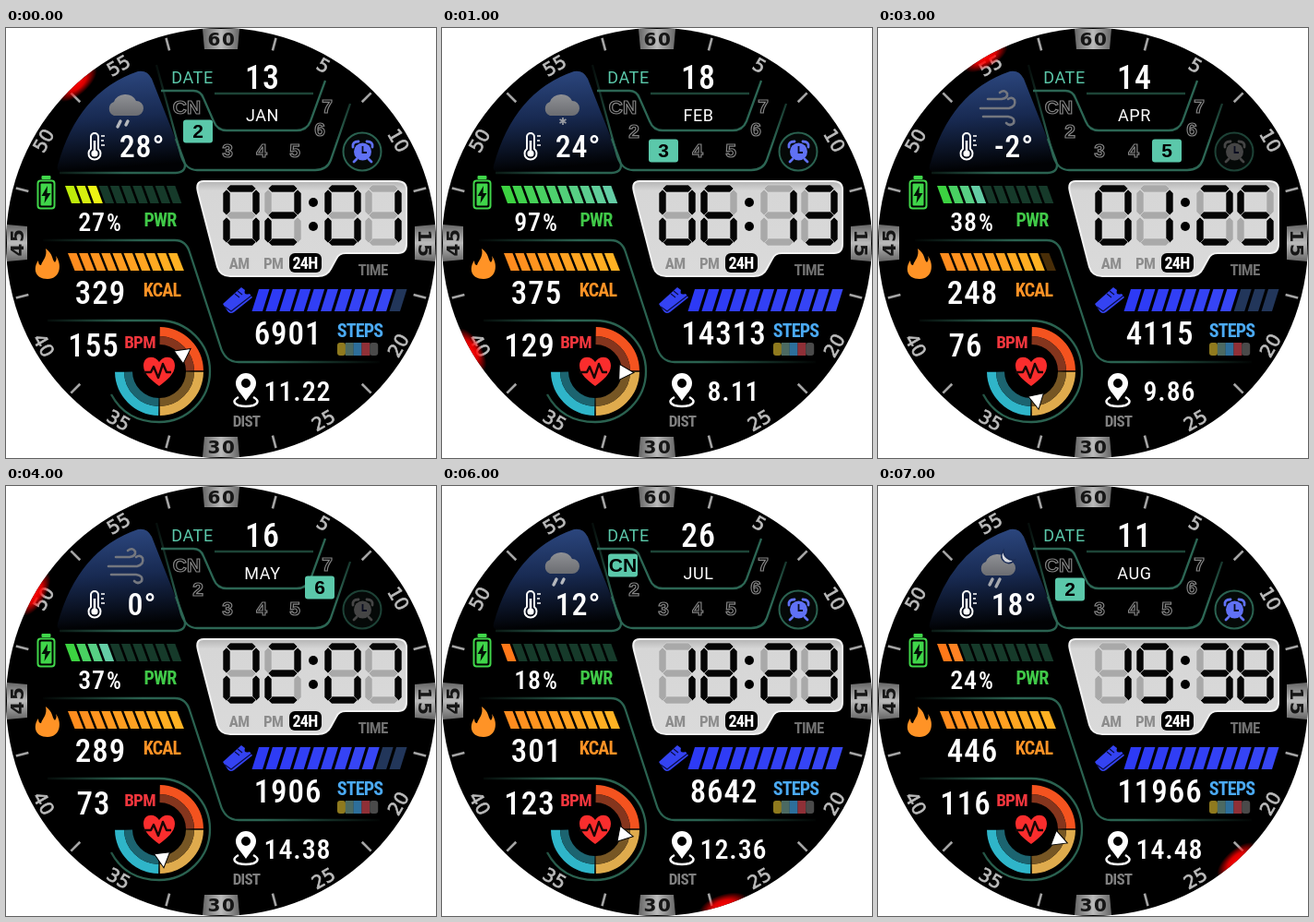
An HTML page for the animation above (8 s loop, 466x466 px).

```html
<!DOCTYPE html>
<html lang="en">
<head>
<meta charset="utf-8">
<title>Watch face</title>
<style>
  html, body { margin: 0; width: 100%; height: 100%; overflow: hidden; background: #fff; }
  svg { display: block; width: 100vw; height: 100vh; }
  text { font-family: "Roboto Condensed", Roboto, sans-serif; font-stretch: 75%; text-anchor: middle; }
  .num { fill: #fff; font-weight: 500; letter-spacing: .9px; }
  .tag { font-weight: 600; letter-spacing: -.8px; }
  .wide { font-family: Roboto, sans-serif; font-stretch: 100%; letter-spacing: .6px; }
  .day { font: bold 21px "Liberation Sans", sans-serif; }
  .mark { font: 20px "DejaVu Sans", sans-serif; }
  .plate { font: bold 20px "DejaVu Sans", sans-serif; letter-spacing: 1.5px; }
  .line { fill: none; stroke-width: 2.3; }
</style>
</head>
<body>
<svg viewBox="0 0 466 466">
  <defs>
    <clipPath id="dial"><circle cx="233" cy="233" r="233"/></clipPath>
    <linearGradient id="sky" x1=".45" y1="0" x2=".55" y2="1">
      <stop offset="0" stop-color="#2c477f"/><stop offset=".45" stop-color="#182a52"/><stop offset=".95" stop-color="#010204"/>
    </linearGradient>
    <linearGradient id="lcd" x1="0" y1="0" x2="0" y2="1">
      <stop offset="0" stop-color="#b4b4b4"/><stop offset=".1" stop-color="#d6d6d6"/><stop offset="1" stop-color="#dadada"/>
    </linearGradient>
    <linearGradient id="plate" x1="0" y1="0" x2="1" y2="0">
      <stop offset="0" stop-color="#666"/><stop offset=".5" stop-color="#bbb"/><stop offset="1" stop-color="#666"/>
    </linearGradient>
    <linearGradient id="cloud" x1="0" y1="0" x2="0" y2="1">
      <stop offset="0" stop-color="#8f9094"/><stop offset="1" stop-color="#6b6d72"/>
    </linearGradient>
    <linearGradient id="fadeL" gradientUnits="userSpaceOnUse" x1="35" y1="0" x2="190" y2="0">
      <stop offset="0" stop-color="#2a6250" stop-opacity="0"/><stop offset=".6" stop-color="#2a6250"/>
    </linearGradient>
    <linearGradient id="fadeBoth" gradientUnits="userSpaceOnUse" x1="35" y1="0" x2="410" y2="0">
      <stop offset="0" stop-color="#2a6250" stop-opacity="0"/><stop offset=".3" stop-color="#2a6250"/>
      <stop offset=".65" stop-color="#2a6250"/><stop offset="1" stop-color="#2a6250" stop-opacity="0"/>
    </linearGradient>
    <linearGradient id="fadeUp" gradientUnits="userSpaceOnUse" x1="0" y1="45" x2="0" y2="125">
      <stop offset="0" stop-color="#2c6654" stop-opacity=".15"/><stop offset="1" stop-color="#2c6654"/>
    </linearGradient>
    <radialGradient id="glow">
      <stop offset="0" stop-color="#f00"/><stop offset=".45" stop-color="#f00" stop-opacity=".85"/>
      <stop offset="1" stop-color="#f00" stop-opacity="0"/>
    </radialGradient>
  </defs>
  <g clip-path="url(#dial)">
    <rect width="466" height="466"/>
    <g id="bezel"></g>
    <g id="base"></g>
    <g id="live"></g>
  </g>
</svg>
<script>
const TEAL = '#5bc8aa', ORANGE = '#ff9326', GREEN = '#40d64a', BLUE = '#3443f2';
const el = id => document.getElementById(id);
const path = (d, attrs) => `<path d="${d}" ${attrs}/>`;
const line = (d, stroke) => path(d, `class="line" stroke="${stroke}"`);
const text = (x, y, s, size, fill, cls = 'tag', more = '') =>
  `<text x="${x}" y="${y}" class="${cls}" style="font-size:${size}px" fill="${fill}" ${more}>${s}</text>`;
const num = (x, y, s, size) => text(x, y, s, size, '#fff', 'num');
const range = n => [...Array(n).keys()];
const mix = (a, b, k) => `rgb(${a.map((v, i) => Math.round(v + (b[i] - v) * k))})`;

// Slanted bars: the first `lit` run through a gradient, the rest are dim.
function bars(x, y, n, lit, pitch, w, h, lean, from, to, dim) {
  return range(n).map(i => {
    const fill = i < lit ? mix(from, to, i / Math.max(1, lit - 1)) : dim;
    const left = x + i * pitch;
    return path(`M${left} ${y}h${w}l${lean} ${h}h${-w}z`, `fill="${fill}"`);
  }).join('');
}

function bezel() {
  let out = '';
  for (let a = 15; a < 360; a += 30)
    out += `<path d="M233 3v14" stroke="#a5a5a5" stroke-width="2.6" transform="rotate(${a} 233 233)"/>`;
  for (let s = 5; s <= 60; s += 5) {
    const a = s * 6, rad = a * Math.PI / 180, main = s % 15 === 0;
    const r = main ? 221 : 222;
    const x = 233 + r * Math.sin(rad), y = 233 - r * Math.cos(rad);
    const turn = a > 90 && a < 270 ? a - 180 : a;
    const flip = turn === a ? 1 : -1;
    out += `<g transform="translate(${x} ${y}) rotate(${turn})">` + (main
      ? `<path d="M-20 -11H20L18 11H-18z" fill="url(#plate)" transform="scale(1 ${flip})"/>` + text(1, 7, s, 20, '#161616', 'plate')
      : text(0, 7, s, 20, '#bbb', 'mark', 'stroke="#bbb" stroke-width=".7"')) + '</g>';
  }
  return out;
}

function ringArc(r, w, from, color) {
  const at = deg => {
    const a = deg * Math.PI / 180;
    return `${166 + r * Math.cos(a)} ${372 + r * Math.sin(a)}`;
  };
  return path(`M${at(from)}A${r} ${r} 0 0 1 ${at(from + 88)}`, `fill="none" stroke="${color}" stroke-width="${w}"`);
}

function base() {
  const rings = [[-89, '#f4531f', '#85351d'], [1, '#dfab4d', '#765624'], [91, '#2fb5c9', '#1c6470']];
  const strip = ['#8f7a1e', '#4c6a62', '#2d6f9b', '#8f3037', '#4a4a4a'];
  return path('M56 149Q78 69 143 47Q153 45 158 55L193 144Q196 156 186 156H62Q54 156 56 149z', 'fill="url(#sky)"') +
    line('M58 157H184Q197 156 193 144L184 120', 'url(#fadeL)') +
    // date panel
    line('M163 40L190 139Q195 154 207 154H335Q348 154 352 143L373 82', 'url(#fadeUp)') +
    line('M168 68H203Q211 68 214 76L225 101Q229 111 239 111H315Q326 111 330 101L346 57', '#2c6654') +
    line('M226 71H333', '#1d4437') +
    text(202, 60, 'DATE', 18, TEAL, 'wide') +
    // panel borders
    line('M40 230H183Q195 230 199 243L232 344Q237 362 252 362H405', 'url(#fadeBoth)') +
    line('M45 317H166A55 55 0 0 1 221 372A55 55 0 0 1 166 427Q130 427 114 397', 'url(#fadeL)') +
    // battery
    `<rect x="34.500" y="165.500" width="18" height="30" rx="3" fill="none" stroke="${GREEN}" stroke-width="2"/>
     <rect x="37.500" y="168.500" width="12" height="24" rx="1" fill="${GREEN}"/>
     <rect x="38.500" y="160" width="10" height="4" rx="1" fill="${GREEN}"/>` +
    path('M45 171L38.500 182H42.500L41.500 190L48.500 179H44.500z', 'fill="#031006"') +
    text(167, 214.500, 'PWR', 20, '#40c848') +
    // flame
    path('M43 239C52 246 49 250 53 254C55 251 55 250 54 247C61 256 59 272 45 272C31 272 29 260 35 252C35 255 36 257 38 257C40 251 45 248 43 239z', `fill="${ORANGE}"`) +
    text(169, 291, 'KCAL', 20, ORANGE) +
    // pulse ring
    rings.map(([a, hi, lo]) => ringArc(43, 10, a, hi) + ringArc(33.500, 9, a, lo)).join('') +
    path('M166 388C158 382 149 375 149 366C149 355 161 354 166 362C171 354 183 355 183 366C183 375 174 382 166 388z', 'fill="#fa2d2d"') +
    path('M149 373H157L160 367L165 379L170 364L174 373H179', 'fill="none" stroke="#180606" stroke-width="2.4" stroke-linejoin="round"') +
    text(145, 346.500, 'BPM', 19, '#f0363d') +
    // clock
    path('M214 166H424Q434 166 434 175V234Q434 244 425 244H368Q361 244 358 250L352 261Q348 269 338 269H243Q232 269 229 259L208 178Q205 166 214 166z', 'fill="url(#lcd)" stroke="#f2f2f2" stroke-width="2"') +
    text(252.500, 260.500, 'AM', 17, '#8c8c8c') + text(289.500, 260.500, 'PM', 17, '#8c8c8c') +
    '<rect x="307" y="244" width="35" height="21" rx="6"/>' + text(324, 261, '24H', 18, '#fff') +
    text(397.500, 268, 'TIME', 17, '#707070') +
    '<circle cx="333" cy="189" r="5"/><circle cx="333" cy="215" r="5"/>' +
    // shoe
    path('M235 299L255 281L259 284Q257 290 264 288L267 292L247 308Q242 311 239 305z', `fill="${BLUE}"`) +
    path('M237 302L244 307L266 290M248 288L253 292M251 285L256 289', 'fill="none" stroke="#0a0e48" stroke-width="1.3"') +
    text(383.500, 334.500, 'STEPS', 20, '#4baaf4') +
    strip.map((c, i) => `<rect x="${359 + i * 8.8}" y="341" width="9" height="14" rx="${i % 4 ? 0 : 3}" fill="${c}"/>`).join('') +
    // distance
    path('M260 404C255 396 249 392 249 385A11 11 0 0 1 271 385C271 392 265 396 260 404zM260 380A5 5 0 1 0 260 390A5 5 0 1 0 260 380z', 'fill="#fff" fill-rule="evenodd"') +
    path('M252 400Q243 405 252 409Q260 411 268 409Q277 405 268 400', 'fill="none" stroke="#fff" stroke-width="2.5"') +
    text(260.500, 431.500, 'DIST', 17, '#808080') +
    // thermometer
    path('M92 131V118A4 4 0 0 1 100 118V131A6.500 6.500 0 1 1 92 131z', 'fill="none" stroke="#fff" stroke-width="2"') +
    path('M96 122V136', 'stroke="#fff" stroke-width="2.5"') +
    '<circle cx="96" cy="136" r="3.600" fill="#fff"/>' +
    path('M103 117h4M103 122h3M103 127h4', 'stroke="#fff" stroke-width="1.6"');
}

const CLOUD = path('M117 95A8 8 0 0 1 117 80A13 12 0 0 1 141 79A8 8 0 0 1 141 95z', 'fill="url(#cloud)"');
const WEATHER = {
  rain: CLOUD + path('M124 101l-3 6m11 -6l-2 4', 'stroke="#b5b8bd" stroke-width="3.4" stroke-linecap="round"'),
  snow: CLOUD + path('M131 97v8M127.500 99l7 4M134.500 99l-7 4', 'stroke="#999ca2" stroke-width="1.7"'),
  wind: path('M119 77H134Q141 76 140 71Q137 66 132 70M111 87H142Q150 85 148 78Q145 74 141 77M114 96H141Q149 97 147 103Q143 107 139 103', 'fill="none" stroke="#74777f" stroke-width="2.6" stroke-linecap="round"'),
  night: `<g transform="translate(0 2)">${CLOUD}</g>` +
    path('M136 70A10 10 0 0 0 148 80Q143 86 137 82Q131 77 136 70z', 'fill="#d9dbe0" stroke="#1b2d57" stroke-width="1.5"') +
    path('M124 101l-3 6m11 -6l-4 8', 'stroke="#a5a8ae" stroke-width="3.4" stroke-linecap="round"')
};

const SEGMENTS = [0x3f, 0x06, 0x5b, 0x4f, 0x66, 0x6d, 0x7d, 0x07, 0x7f, 0x6f];
function digit(x, n) {
  const h = 'l4 -4h24l4 4l-4 4h-24z', v = 'l4 4v20l-4 4l-4 -4v-20z';
  const segs = ['M3 4' + h, 'M35 5' + v, 'M35 35' + v, 'M3 62' + h, 'M3 35' + v, 'M3 5' + v, 'M3 33' + h];
  return `<g transform="translate(${x} 170)">` + segs.map((d, i) =>
    path(d, `stroke="#dadada" stroke-width=".6" fill="${SEGMENTS[n] >> i & 1 ? '#050505' : '#a9a9a9'}"`)).join('') + '</g>';
}

const DAYS = [['CN', 196, 86], [2, 208, 112], [3, 240, 133], [4, 277, 133], [5, 313, 133], [6, 340, 110], [7, 348, 85]];
function week(on) {
  return DAYS.map(([name, x, y], i) => i === on
    ? `<rect x="${x - 16}" y="${y - 12.5}" width="32" height="25" rx="3" fill="${TEAL}"/>` + text(x, y + 7, name, 21, '#000', 'day')
    : text(x, y + 7, name, 21, '#000', 'day', 'stroke="#858585" stroke-width="1.2"')).join('');
}

function alarm(on) {
  const c = on ? '#6071f5' : '#454545';
  return `<circle cx="386" cy="134" r="20.500" fill="#050908" stroke="${on ? '#2a6250' : '#1d4236'}" stroke-width="2"/>
    <circle cx="386.500" cy="134" r="9.500" fill="${c}"/>` +
    path('M376 129Q375 123 382 123M397 129Q398 123 391 123M380 142l-3 3M393 142l3 3', `fill="none" stroke="${c}" stroke-width="2.8" stroke-linecap="round"`) +
    path('M386.500 128V135H391', 'fill="none" stroke="#090c20" stroke-width="1.8"');
}

const STATES = [
  { date: 13, month: 'JAN', day: 1, sky: 'rain', temp: 28, alarm: 1, time: '0201', pwr: 27, cells: 3, kcal: 329, bpm: 155, steps: 6901, lit: 10, dist: '11.22', sec: 53 },
  { date: 18, month: 'FEB', day: 2, sky: 'snow', temp: 24, alarm: 1, time: '0613', pwr: 97, cells: 10, kcal: 375, bpm: 129, steps: 14313, lit: 11, dist: '8.11', sec: 40 },
  { date: 19, month: 'MAR', day: 3, sky: 'wind', temp: -8, alarm: 0, time: '0049', pwr: 40, cells: 4, kcal: 206, bpm: 99, steps: 6323, lit: 6, dist: '5.38', sec: 45 },
  { date: 14, month: 'APR', day: 4, sky: 'wind', temp: -2, alarm: 0, time: '0125', pwr: 38, cells: 4, kcal: 248, bpm: 76, steps: 4115, lit: 8, dist: '9.86', sec: 55 },
  { date: 16, month: 'MAY', day: 5, sky: 'wind', temp: 0, alarm: 0, time: '0207', pwr: 37, cells: 4, kcal: 289, bpm: 73, steps: 1906, lit: 9, dist: '14.38', sec: 50 },
  { date: 21, month: 'JUN', day: 6, sky: 'rain', temp: -18, alarm: 1, time: '1708', pwr: 39, cells: 4, kcal: 112, bpm: 131, steps: 1373, lit: 11, dist: '10.24', sec: 22 },
  { date: 26, month: 'JUL', day: 0, sky: 'rain', temp: 12, alarm: 1, time: '1823', pwr: 18, cells: 1, kcal: 301, bpm: 123, steps: 8642, lit: 11, dist: '12.36', sec: 27 },
  { date: 11, month: 'AUG', day: 1, sky: 'night', temp: 18, alarm: 1, time: '1938', pwr: 24, cells: 2, kcal: 446, bpm: 116, steps: 11966, lit: 11, dist: '14.48', sec: 23 }
];

function live(s) {
  const power = s.pwr < 25 ? [[255, 120, 25], [255, 130, 35]]
    : s.pwr < 30 ? [[190, 235, 10], [238, 245, 20]]
    : [[60, 210, 65], [100, 205, 165]];
  return `<ellipse cx="233" cy="0" rx="27" ry="12" fill="url(#glow)" transform="rotate(${s.sec * 6} 233 233)"/>` +
    WEATHER[s.sky] + num(147.500, 140, s.temp + '°', 34) +
    num(278, 66, s.date, 36) + text(278, 101, s.month, 18, '#fff', 'wide') +
    week(s.day) + alarm(s.alarm) +
    [236, 281, 346, 390].map((x, i) => digit(x, +s.time[i])).join('') +
    bars(64, 171, 10, s.cells, 12.2, 9.500, 19, 7, ...power, '#163a2a') +
    num(102, 220, s.pwr + '<tspan font-size="25" dx="1">%</tspan>', 28) +
    bars(67, 244, 10, Math.min(10, Math.ceil(s.kcal / 30)), 12.1, 9.500, 19, 7.500, [255, 140, 30], [255, 178, 35], '#492e08') +
    num(102.500, 299, s.kcal, 35) +
    bars(274, 283, 11, s.lit, 14.9, 11.500, 24, -7.500, [45, 58, 245], [55, 70, 245], '#22365a') +
    num(305.500, 343, s.steps, 35) +
    num(95, 356, s.bpm, 35) +
    `<g transform="rotate(${2 - (s.bpm - 129) * 1.45} 166 372)">` +
      path('M208 372L192 363.500V380.500z', 'fill="#fff" stroke="#000" stroke-width="1"') + '</g>' +
    num(316, 403.500, s.dist, 30);
}

el('bezel').innerHTML = bezel();
el('base').innerHTML = base();

let shown = -1;
const start = performance.now();
function tick() {
  const i = Math.floor((performance.now() - start) / 1000) % STATES.length;
  if (i !== shown) el('live').innerHTML = live(STATES[shown = i]);
  requestAnimationFrame(tick);
}
tick();
</script>
</body>
</html>
```
